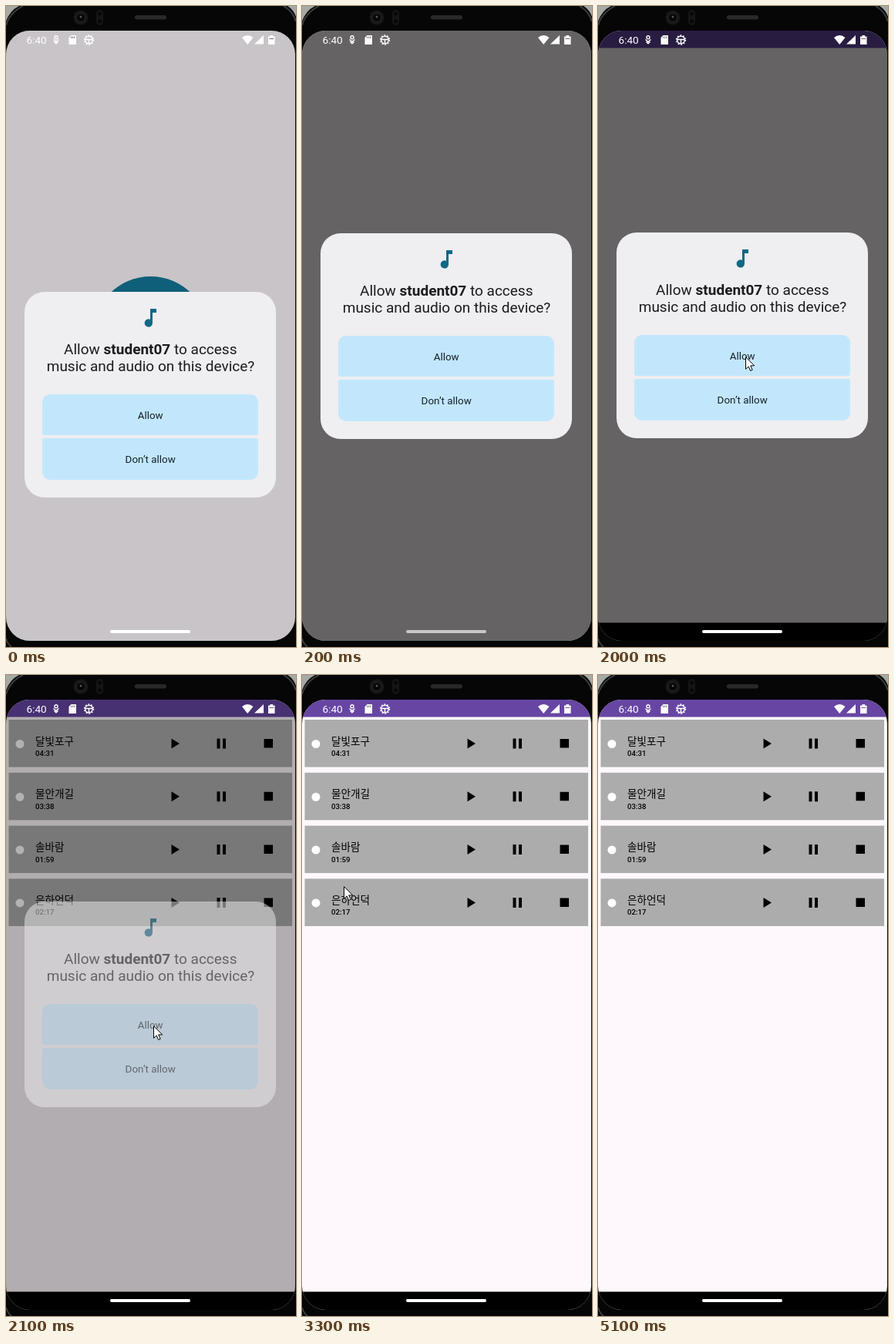
Write an HTML page that moves like this. It is 376 by 832 pixels and loops after 6.5 s.

```html
<!DOCTYPE html>
<html lang="ko">
<head>
<meta charset="utf-8">
<title>Music list</title>
<style>
html, body { margin: 0; height: 100%; overflow: hidden; background: #060607; }
svg { display: block; width: 376px; height: 832px; }
text { font-family: Roboto, sans-serif; }
.name { font: 500 13.6px "Noto Sans CJK KR", "Noto Sans CJK", sans-serif; }
.len { font-size: 9.7px; font-weight: 500; }
.ask { font-size: 19px; fill: #1b1b1f; text-anchor: middle; }
.label { font-size: 13.4px; fill: #15202a; text-anchor: middle; }
</style>
</head>
<body>
<svg viewBox="0 0 376 832">
  <defs>
    <clipPath id="glass"><rect y="32" width="375" height="792" rx="31"/></clipPath>
  </defs>

  <!-- phone body -->
  <rect width="376" height="832" fill="#060607"/>
  <path d="M0 0H17Q5 6 0 20ZM376 0H365Q373 5 376 14Z" fill="#a5aaa5"/>
  <path d="M0 25Q5 8 22 0M376 20Q372 7 360 0M0 821Q2 828 7 832" fill="none" stroke="#3c3e3d" stroke-width="2"/>
  <circle cx="97" cy="15" r="9.5" fill="#171718"/>
  <circle cx="97" cy="15" r="5.5" fill="#050506" stroke="#29292b"/>
  <circle cx="97" cy="14" r="1.5" fill="#55565a"/>
  <rect x="117" y="5" width="9" height="20" rx="4.5" fill="#151516"/>
  <circle cx="121.500" cy="10" r="2.500" fill="#080809"/>
  <circle cx="121.500" cy="20" r="2.500" fill="#080809"/>
  <rect x="167" y="12" width="41" height="5.500" rx="2.700" fill="#29292a"/>

  <g clip-path="url(#glass)">
    <rect y="32" width="376" height="792" fill="#fef8fc"/>
    <circle id="splash" cx="187.500" cy="426" r="75" fill="#13789a"/>
    <g id="list"></g>
    <rect id="bar" y="32" width="376" height="22.500" fill="#6746a3"/>
    <rect id="dim" y="32" width="376" height="792"/>
    <rect id="nav" y="800.500" width="376" height="24"/>
  </g>

  <!-- status icons -->
  <g fill="#fff">
    <text x="26.500" y="49" font-size="13.600">6:40</text>
    <g fill="none" stroke="#fff" stroke-width="1.400">
      <circle cx="65" cy="40.800" r="2"/>
      <path d="M61.500 43.500L65 46.500 68.500 43.500M62.500 46.500L65 48.800 67.500 46.500"/>
      <circle cx="107.500" cy="44" r="4.800"/>
      <circle cx="107.500" cy="44" r="6" stroke-dasharray="1.900 1.870"/>
      <path d="M103 43.500H112M107.500 44V49"/>
    </g>
    <path d="M84.500 38H91V50H81.500V41Z"/>
    <path d="M84.500 39.500V42M86.500 39.500V42M88.500 39.500V42" stroke="#777"/>
    <path d="M306 41Q313.200 35 320.500 41L313.200 50Z"/>
    <path d="M334 38V49.500H322Z"/>
    <path d="M342.500 38H346V39.500H348.500V50H340V39.500H342.500Z"/>
    <path d="M341.500 42.500H347" stroke="#666"/>
  </g>
  <rect id="handle" x="135" y="810" width="104" height="4" rx="2"/>

  <g id="dialog">
    <rect x="24" width="326" height="267" rx="26" fill="#efeef1"/>
    <path d="M187 22H195V27H190V40.500A5.200 5.200 0 1 1 187 35.700Z" fill="#0e6985"/>
    <text class="ask" x="187.300" y="80.500">Allow <tspan font-weight="700">student07</tspan> to access</text>
    <text class="ask" x="187.500" y="102.500">music and audio on this device?</text>
    <path d="M47 183V145Q47 133 59 133H315Q327 133 327 145V183Q327 186 324 186H50Q47 186 47 183Z
      M47 193V232Q47 244 59 244H315Q327 244 327 232V193Q327 190 324 190H50Q47 190 47 193Z" fill="#c2e7fc"/>
    <text class="label" x="187.200" y="164.500">Allow</text>
    <text class="label" x="187.200" y="222">Don’t allow</text>
  </g>

  <path id="cursor" d="M.5 .7V16.300L4.100 12.900 6.700 18.500 9.200 17.300 6.700 11.900H11.700Z" fill="#fff" stroke="#000"/>
</svg>

<script>
const $ = id => document.getElementById(id);
const songs = [['달빛포구', '04:31'], ['물안개길', '03:38'], ['솔바람', '01:59'], ['은하언덕', '02:17']];

$('list').innerHTML = songs.map(([name, len], i) => `
  <g transform="translate(0 ${58 + i * 68.8})">
    <rect x="3.5" width="367.500" height="61.500" fill="#acacac"/>
    <circle cx="18" cy="31.500" r="5.500" fill="#fff"/>
    <text class="name" x="38" y="32.500">${name}</text>
    <text class="len" x="38" y="47">${len}</text>
    <path d="M214.500 24.500V37.500L225 31ZM273.500 24.500H277.500V37.500H273.500ZM281 24.500H285V37.500H281ZM334.500 25H346V36.500H334.500Z"/>
  </g>`).join('');

// Linear interpolation over [time, value, ...] keys
function at(keys, t, k = 1) {
  const i = keys.findIndex(key => key[0] > t);
  if (i === 0) return keys[0][k];
  if (i < 0) return keys[keys.length - 1][k];
  const a = keys[i - 1], b = keys[i];
  return a[k] + (b[k] - a[k]) * (t - a[0]) / (b[0] - a[0]);
}

const dialogY = [[0, 371], [100, 306], [200, 295], [600, 295], [700, 294]];
const dimming = [[0, .21], [100, .5], [200, .6], [2000, .6], [2200, 0]];
const bars = [[300, 0], [700, 1]];
const pointer = [
  [1000, 372, 663], [1400, 262, 545], [1700, 200, 470], [1900, 191, 455],
  [2500, 191, 455], [2700, 211, 300], [2900, 205, 133], [3100, 120, 165],
  [3200, 86, 212], [3300, 54, 274], [3500, 110, 370], [3700, 225, 437],
  [3800, 256, 410], [3900, 246, 365], [4300, 246, 365], [4400, 242, 365],
  [4700, 242, 365], [4800, 206, 421], [4900, 206, 421], [5000, 195, 393]
];

function draw(t) {
  const bar = at(bars, t);
  const handle = 200 + 55 * Math.max(bar, 1 - t / 200);
  const moving = t >= 1000 && t < 5100 && !(t >= 4100 && t < 4300);
  const show = (id, opacity) => $(id).setAttribute('opacity', opacity);
  const move = (id, x, y) => $(id).setAttribute('transform', `translate(${x} ${y})`);

  show('splash', t < 300 ? 1 : 0);
  show('list', t >= 2100 ? 1 : 0);
  show('bar', bar);
  show('nav', bar);
  show('dim', at(dimming, t));
  show('dialog', at([[2000, 1], [2200, 0]], t));
  show('cursor', moving ? 1 : 0);
  move('dialog', 0, at(dialogY, t));
  move('cursor', Math.round(at(pointer, t)), Math.round(at(pointer, t, 2)));
  $('handle').setAttribute('fill', `rgb(${handle},${handle},${handle})`);
}

const start = performance.now();
function tick() {
  draw(Math.floor((performance.now() - start) % 6500 / 100) * 100);
  requestAnimationFrame(tick);
}
tick();
</script>
</body>
</html>
```
